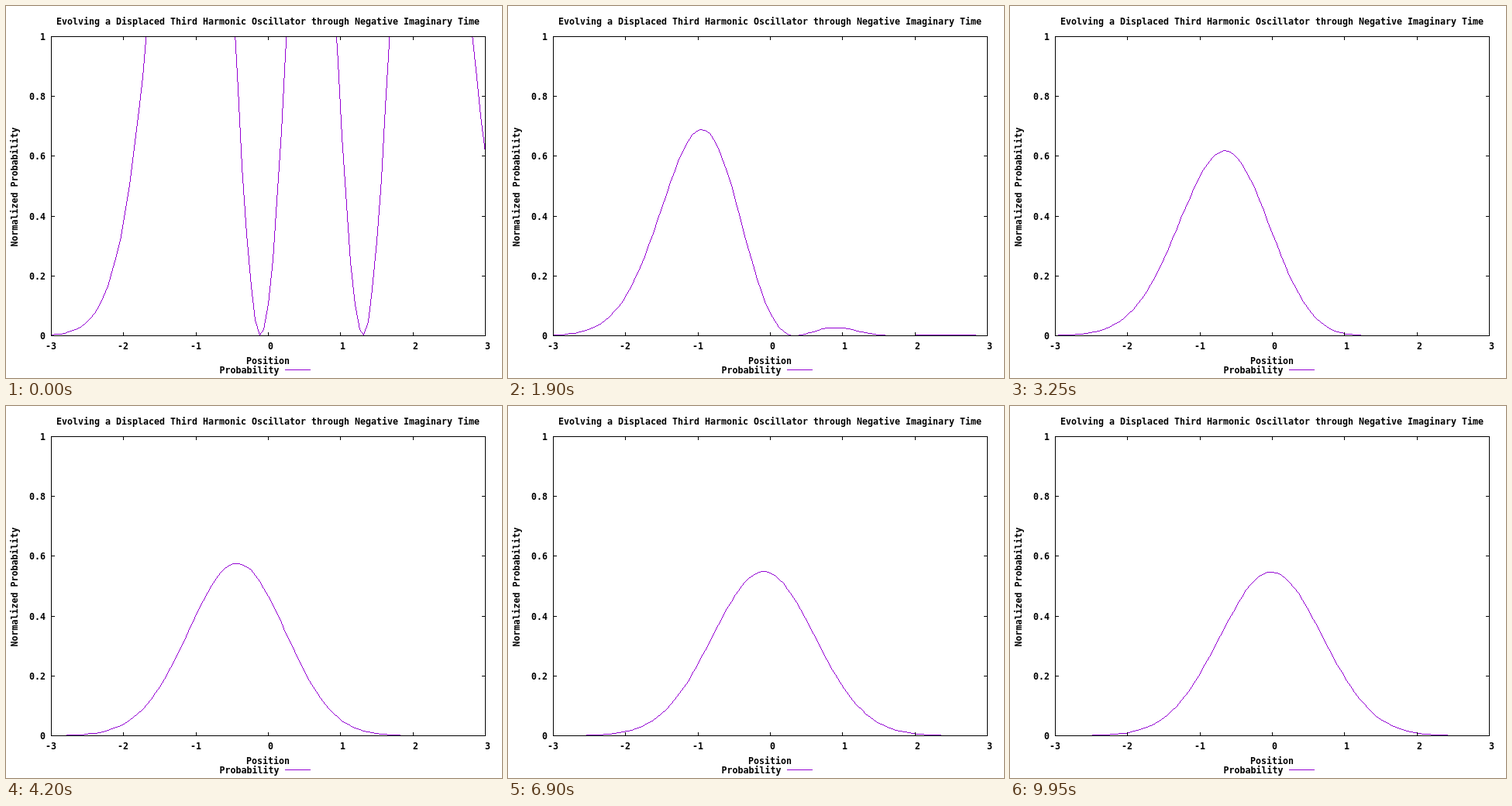
An HTML page with a canvas that plays this animation: 640x480 px, repeating every 10000 ms.

```html
<!DOCTYPE html>
<html lang="en">
<head>
<meta charset="utf-8">
<title>Harmonic oscillator in imaginary time</title>
<style>
  html, body { margin: 0; width: 100%; height: 100%; overflow: hidden; background: #fff; }
  canvas, svg { position: absolute; left: 0; top: 0; width: 640px; height: 480px; }
  text { font: bold 11.63px "DejaVu Sans Mono", monospace; white-space: pre; }
  .line { fill: none; stroke: #000; shape-rendering: crispEdges; }
  .end { text-anchor: end; }
</style>
</head>
<body>
<canvas id="plot" width="640" height="480"></canvas>
<svg id="axes" viewBox="0 0 640 480">
  <rect class="line" x="58.5" y="39.5" width="560" height="386"/>
  <path class="line" id="ticks"/>
  <path class="line" d="M360 469.5h33" style="stroke:#9400d3"/>
  <text x="65" y="24">Evolving a Displaced Third Harmonic Oscillator through Negative Imaginary Time</text>
  <text x="310" y="462">Position</text>
  <text x="275.5" y="474">Probability</text>
  <text transform="translate(15 310.5) rotate(-90)">Normalized Probability</text>
</svg>
<script>
const LEFT = 58, RIGHT = 618, TOP = 39, BOTTOM = 425;
const FRAMES = 200, FRAME_MS = 50, STEP = 0.03, SHIFT = 0.6, SAMPLES = 100;

const px = x => LEFT + Math.round((x + 3) / 6 * (RIGHT - LEFT));
const py = p => BOTTOM - Math.round(p * (BOTTOM - TOP));

function addLabel(text, x, y, cls) {
  const el = document.createElementNS("http://www.w3.org/2000/svg", "text");
  el.setAttribute("x", x);
  el.setAttribute("y", y);
  if (cls) el.setAttribute("class", cls);
  el.textContent = text;
  document.getElementById("axes").append(el);
}

function drawAxes() {
  let d = "";
  for (let v = -3; v <= 3; v++) {
    const x = px(v);
    d += `M${x + 0.5} ${TOP}v5M${x + 0.5} ${BOTTOM + 1}v-5`;
    addLabel(v, v < 0 ? x - 7 : x, 443);
  }
  for (let k = 0; k <= 5; k++) {
    const y = py(k / 5);
    d += `M${LEFT} ${y + 0.5}h5M${RIGHT + 1} ${y + 0.5}h-5`;
    addLabel(k / 5, 51, y + 5, "end");
  }
  document.getElementById("ticks").setAttribute("d", d);
}

// Displaced second-level state after imaginary time tau:
// gain * exp(-(x - c)^2) * ((x - m)^2 - 1/2)^2
function stateAt(tau) {
  const c = SHIFT * Math.exp(-tau);
  const m = SHIFT * Math.cosh(tau);
  const b2 = (m - c) ** 2;
  const gain = 16 * Math.exp(-5 * tau + (c * c - SHIFT * SHIFT) / 2) / Math.sqrt(Math.PI);
  const norm = gain * Math.sqrt(Math.PI) * (0.5 + 2 * b2 + b2 * b2);
  return { c, m, gain, norm };
}

// Each step decays the previously normalized state; the first starts unnormalized.
function densityAt(frame) {
  const { c, m, gain } = stateAt((frame + 1) * STEP);
  const scale = gain / (frame ? stateAt(frame * STEP).norm : 1);
  return x => scale * Math.exp(-((x - c) ** 2)) * ((x - m) ** 2 - 0.5) ** 2;
}

const ctx = document.getElementById("plot").getContext("2d");

function pixelLine(x0, y0, x1, y1) {
  const n = Math.max(Math.abs(x1 - x0), Math.abs(y1 - y0), 1);
  for (let i = 0; i <= n; i++) {
    const y = Math.round(y0 + (y1 - y0) * i / n);
    if (y >= TOP) ctx.fillRect(Math.round(x0 + (x1 - x0) * i / n), y, 1, 1);
  }
}

function drawCurve(frame) {
  const density = densityAt(frame);
  ctx.clearRect(0, 0, 640, 480);
  ctx.fillStyle = "#9400d3";
  let lastX, lastY;
  for (let i = 0; i <= SAMPLES; i++) {
    const x = -3 + 6 * i / SAMPLES;
    const sx = px(x), sy = py(density(x));
    if (i) pixelLine(lastX, lastY, sx, sy);
    lastX = sx;
    lastY = sy;
  }
}

let shown = -1;
function tick() {
  const frame = Math.floor(performance.now() / FRAME_MS) % FRAMES;
  if (frame !== shown) drawCurve(shown = frame);
  requestAnimationFrame(tick);
}

drawAxes();
tick();
</script>
</body>
</html>
```
